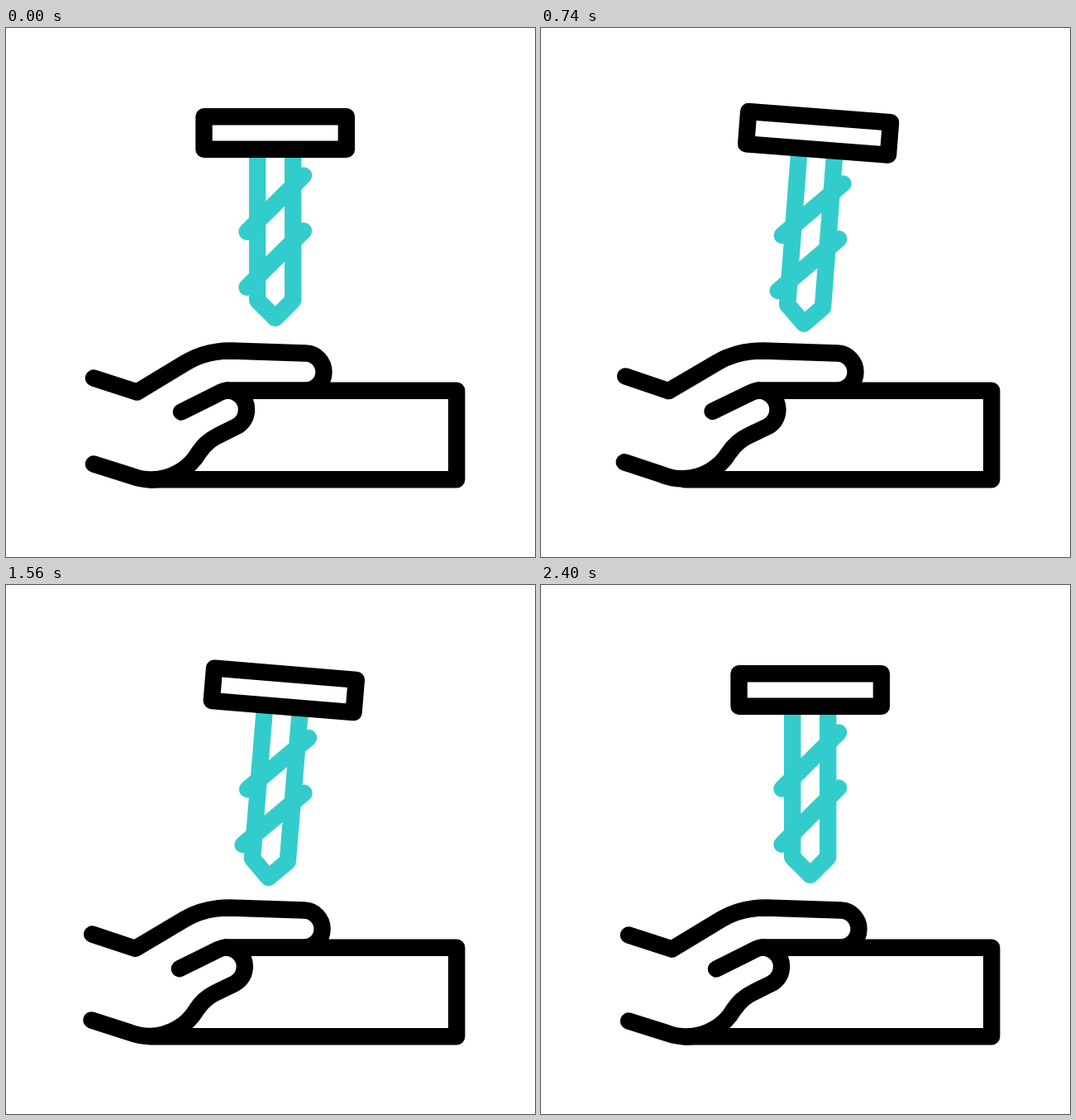
These frames come from a looping animation (640 by 640 pixels, 2420 ms). An HTML page:

```html
<!DOCTYPE html>
<html lang="en">
<head>
<meta charset="utf-8">
<title>Drill and hand</title>
<style>
  html, body { margin: 0; height: 100%; overflow: hidden; background: #fff; }
  svg { display: block; width: 100vw; height: 100vh; }
</style>
</head>
<body>
<svg viewBox="0 0 640 640" fill="none" stroke="#000" stroke-width="20.4" stroke-linecap="round" stroke-linejoin="round">
  <rect x="174" y="438.7" width="371.2" height="107.5"/>
  <path id="hand" fill="#fff"/>
  <path id="thumb"/>
  <path id="sparks" stroke="#33cccc"/>
  <g id="tool">
    <path id="drill" stroke="#33cccc"/>
    <rect x="239.5" y="107.2" width="172.4" height="39.5" fill="#fff"/>
  </g>
</svg>
<script>
const LOOP = 2420, END = 2400, STROKE = 400, DEPTH = 32.4;
const tilts = [0, -5, 5, -5, 5, -5, 0];

const handPoses = [
  `M106 423.5 L158.5 440.5 L218 404.5 C234 395 252 390.5 272 390.5 L363 393.5
   C375 394 384.5 404 384.5 416 C384.5 428.5 375 438.5 362 438.5 L268 438.5
   C280.5 438.5 291 449 291 461.5 C291 470.5 286.5 478 279 482 L255 494
   C246 498.5 238.5 505.5 233 514 C222 533 200 546.5 176 546.5
   C168 546.5 160 545 152 542 L106 527.5`,
  `M35.7 384.6 L82.9 414.4 L148.8 394.9 C165.9 390.2 186 389.4 207 390 L289.5 393.5
   C301.5 394 310.5 404 310.5 416 C310.5 428 302.6 437.5 290.7 438 L184 439.6
   C196 439.6 206.4 449.6 206.4 461.5 C206.4 472 200.8 481.2 191.2 483.6 L159.2 491.3
   C150.2 493.7 141 499.6 134 506.5 C122 517.6 105.2 523.6 88.7 523.6
   C75.4 523.6 63 518.9 52 512.2 L10.2 486`
];
const thumbPoses = [
  'M212 464.5 L258 441.5 C261 440 264.5 438.5 268 438.5',
  'M129 451.2 L177.1 440.4 C179.5 439.9 181.5 439.6 184 439.6'
];
// Track of each spark: x, y of the inner and the outer end
const sparkTracks = [
  [387.8, 347.5, 419, 289.6],
  [398.7, 363.4, 484, 315],
  [404, 382.2, 461.9, 397.3]
];

const $ = id => document.getElementById(id);
const mix = (a, b, p) => a + (b - a) * p;
const clamp = x => Math.min(1, Math.max(0, x));
const smooth = x => x * x * (3 - 2 * x);

// Cubic bezier easing (1/6, 0, 2/3, 1)
function quickStart(x) {
  let low = 0, high = 1;
  for (let i = 0; i < 24; i++) {
    const s = (low + high) / 2, r = 1 - s;
    if (r * r * s / 2 + 2 * r * s * s + s ** 3 < x) low = s; else high = s;
  }
  return smooth(low);
}

function morph([from, to], p) {
  const target = to.match(/[\d.]+/g);
  let i = 0;
  return from.replace(/[\d.]+/g, n => mix(+n, +target[i++], p).toFixed(2));
}

function sparkPath(ms) {
  const head = smooth(clamp((ms - 60) / 200)), tail = smooth(clamp((ms - 120) / 200));
  if (head <= tail) return '';
  return sparkTracks.map(([x0, y0, x1, y1]) =>
    `M${mix(x0, x1, tail)} ${mix(y0, y1, tail)}L${mix(x0, x1, head)} ${mix(y0, y1, head)}`).join('');
}

function drillPath(d) {
  return `M304.2 147V${329.5 + d}L325.7 ${351 + d}L347.2 ${329.5 + d}V147
    M291.5 ${246.5 + d}L360 ${178.5 + d}M291.5 ${313.8 + d}L360 ${245.5 + d}`;
}

function draw(now) {
  const t = Math.min(now % LOOP, END - 0.001);
  const step = Math.floor(t / STROKE), ms = t % STROKE, x = ms / STROKE;
  const pull = step % 2 ? 1 - quickStart(x) : smooth(x);
  const depth = DEPTH * smooth(1 - Math.abs(2 * x - 1));
  const tilt = mix(tilts[step], tilts[step + 1], smooth(x));

  $('hand').setAttribute('d', morph(handPoses, pull));
  $('thumb').setAttribute('d', morph(thumbPoses, pull));
  $('sparks').setAttribute('d', sparkPath(ms));
  $('drill').setAttribute('d', drillPath(depth));
  $('tool').setAttribute('transform', `rotate(${tilt} 325.7 256)`);
}

let start;
function tick(now) {
  start ??= now;
  draw(now - start);
  requestAnimationFrame(tick);
}
draw(0);
requestAnimationFrame(tick);
</script>
</body>
</html>
```
